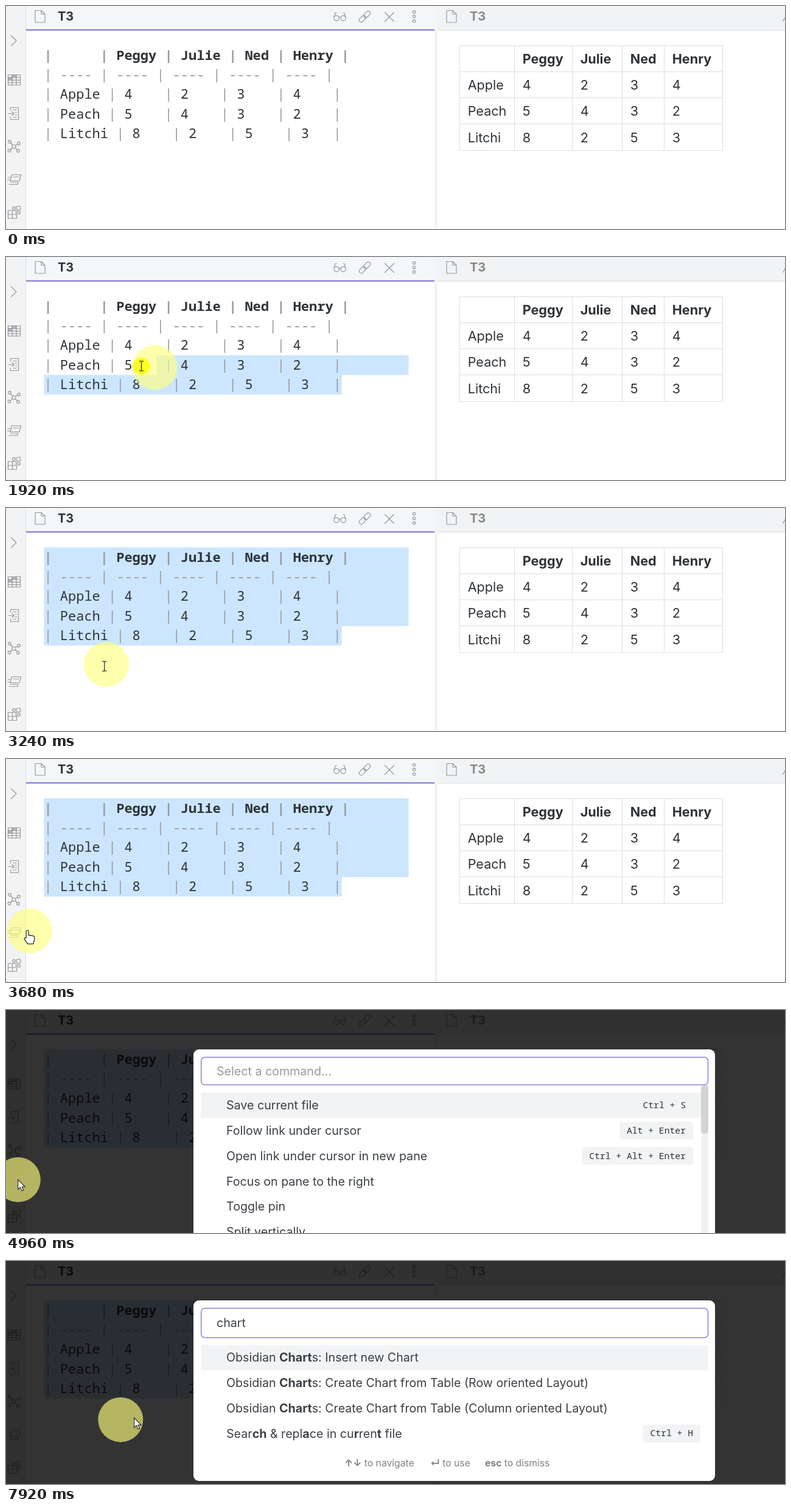
An HTML page for the animation above (8000 ms loop, 1280 by 368 pixels).

```html
<!DOCTYPE html>
<html lang="en">
<head>
<meta charset="utf-8">
<title>Command palette</title>
<style>
  html, body { margin: 0; width: 100%; height: 100%; overflow: hidden; background: #fff; }
  svg { display: block; width: 1280px; height: 368px; }
  text { font-family: Inter, "Open Sans", sans-serif; fill: #2e3338; white-space: pre; }
  .mono { font-family: "Noto Sans Mono", "DejaVu Sans Mono", monospace; }
  .source { font-size: 22px; }
  .cell { font-size: 21.6px; }
  .row { font-size: 19.64px; fill: #3b4046; }
  .key { font-size: 14.7px; }
  .hint { font-size: 15.7px; fill: #7d8185; }
  .bold { font-weight: 700; }
  .dim { fill: #999; }
  .icon { fill: none; stroke: #96999c; stroke-width: 1.2; stroke-linecap: round; stroke-linejoin: round; }
</style>
</head>
<body>
<svg id="stage" viewBox="0 0 1280 368" xmlns="http://www.w3.org/2000/svg">
  <rect width="1280" height="368" fill="#fff"/>
  <rect width="32" height="368" fill="#f2f3f5"/>
  <rect x="32" width="1" height="368" fill="#dcdfe3"/>
  <rect x="33" width="671" height="39" fill="#f5f6f8"/>
  <rect x="33" y="38.5" width="671" height="2" fill="#7b6cd9"/>
  <rect x="704" width="5" height="368" fill="#f3f4f7"/>
  <rect x="709" width="571" height="39" fill="#f2f3f5"/>
  <rect x="709" y="39" width="571" height="1.5" fill="#dfe3e5"/>
  <text x="85" y="24" font-size="20" class="bold">T3</text>
  <text x="762" y="24" font-size="20" class="bold" style="fill:#888">T3</text>
  <g class="icon">
    <path id="page" d="M48 7.5h10l6 6v13.500h-16zM58 7.500v6h6"/>
    <use href="#page" x="676"/>
    <circle cx="543" cy="20" r="4.2"/><circle cx="554" cy="20" r="4.2"/>
    <path d="M547 19q1.500-2 3 0M539 18l2-7h2M558 18l-2-7h-2"/>
    <g transform="rotate(-45 589.500 17.500)">
      <rect x="578" y="14" width="12.500" height="7" rx="3.500"/><rect x="588.500" y="14" width="12.500" height="7" rx="3.500"/>
    </g>
    <path d="M622.500 10.500l15 15m0-15l-15 15"/>
    <circle cx="670.500" cy="9.800" r="2.200"/><circle cx="670.500" cy="17.300" r="2.200"/><circle cx="670.500" cy="24.800" r="2.200"/>
    <path d="M1277 25l3-6"/>
    <path d="M8.500 49l8.500 8-8.500 8.500"/>
    <path d="M3.500 113.500h20v17h-20zM3.500 118h20M3.500 122.300h20M3.500 126.500h20M10 113.500v17M17 113.500v17"/>
    <path d="M10 113.500h7v4.500h-7zM3.500 118h6.500v4.300h-6.500z" fill="#b4b6b9"/>
    <path d="M7.500 172v-4.500h13v20h-13v-4.500M4 177.500h9m-3-3l3 3-3 3M12 171.500h5M15 175.500h2.500M15 179.500h2.500M12 183.500h5"/>
    <path d="M13 232l-6-7M13 232l7-5M13 232l-7 6M13 232l6 6"/>
    <circle cx="13" cy="232" r="3" fill="#f2f3f5"/>
    <circle cx="6" cy="224" r="2.300" fill="#f2f3f5"/><circle cx="21" cy="227" r="2.300" fill="#f2f3f5"/>
    <circle cx="5.500" cy="238.500" r="2.300" fill="#f2f3f5"/><circle cx="20" cy="239" r="2.300" fill="#f2f3f5"/>
    <path d="M9.500 278.500h15l-2.500 10h-15zM7 291h13l-1 3.500h-14M3 283h4M2.500 287h3.500M12 282h9"/>
    <path d="M3.500 337.500h7v6.500h-7zM3.500 344h7v6.500h-7zM10.500 344h7v6.500h-7zM10.500 337.500h6v6.500M17 331l6-1 1 6-6 1z"/>
    <circle cx="13" cy="333.500" r="2.400"/><circle cx="21" cy="341" r="2.400"/>
  </g>
  <g id="selection" fill="#cce6ff"></g>
  <g id="document"></g>
  <g id="tooltip">
    <path d="M35 290l7-6v12z" fill="#191919"/>
    <rect x="41" y="271" width="224" height="37" rx="6" fill="#191919"/>
    <text x="57" y="296.500" font-size="17.7" style="fill:#dcddde">Open command palette</text>
  </g>
  <g id="palette"></g>
  <g id="pointer">
    <circle id="halo" r="37" fill="#ffff7d" fill-opacity=".64"/>
    <circle id="press" r="14" fill="#ffff10" fill-opacity=".9"/>
    <circle id="ring" cx="20" cy="280.500" fill="none" stroke="#fb4528" stroke-width="3"/>
    <path id="beam" d="M-3.500-8h2.500l1 1 1-1h2.500M0-7v14M-3.500 8h2.500l1-1 1 1h2.500" fill="none" stroke="#333" stroke-width="1.300"/>
    <path id="arrow" d="M0 0v16l3.700-3.400 2.600 6 2.700-1.200-2.600-5.700h5z" fill="#fff" stroke="#222" stroke-width="1.100"/>
    <path id="hand" d="M-2 1q2-3 4 0v7q2-1 3 .5 2-1 3 .5 3-1 3.500 2v5l-2 6h-9l-5.500-8q0-3 3-1.500z" fill="#fff" stroke="#222" stroke-width="1.200" stroke-linejoin="round"/>
  </g>
</svg>
<script>
const LOOP = 8000, LAG = 30;
const $ = id => document.getElementById(id);
const show = (el, on) => el.setAttribute('visibility', on ? 'visible' : 'hidden');
const place = (el, [x, y]) => el.setAttribute('transform', `translate(${x} ${y})`);
const clamp = (v, lo, hi) => Math.min(hi, Math.max(lo, v));
const rect = (x, y, w, h, fill, extra = '') =>
  `<rect x="${x}" y="${y}" width="${w}" height="${h}" fill="${fill}" ${extra}/>`;
const text = (x, y, cls, s) => `<text x="${x}" y="${y}" class="${cls}">${s}</text>`;
const strong = s => s.replace(/\*(.+?)\*/g, '<tspan class="bold">$1</tspan>');

// Editor and rendered table
const COLUMN = 13.2, LEFT = 62.4, TOP = 65, LINE = 32.4;
const source = [
  '|      | Peggy | Julie | Ned | Henry |',
  '| ---- | ---- | ---- | ---- | ---- |',
  '| Apple | 4    | 2    | 3    | 4    |',
  '| Peach | 5    | 4    | 3    | 2    |',
  '| Litchi | 8    | 2    | 5    | 3   |'
];
const table = [
  ['', 'Peggy', 'Julie', 'Ned', 'Henry'],
  ['Apple', 4, 2, 3, 4],
  ['Peach', 5, 4, 3, 2],
  ['Litchi', 8, 2, 5, 3]
];
const edges = [745.5, 835.5, 930.5, 1012.5, 1081.5, 1177.5];

function drawDocument() {
  const lines = source.map((line, i) => text(LEFT, 88.6 + i * LINE, 'mono source' + (i ? '' : ' bold'),
    line.replace(/\||-+/g, '<tspan class="dim">$&</tspan>')));
  const cells = table.map((row, r) => row.map((value, c) =>
    text(edges[c] + 13.2, 95 + r * 43.2, 'cell' + (r ? '' : ' bold'), value)).join(''));
  const rules = edges.map(x => `M${x} 65v173.500`).join('') +
    [0, 1, 2, 3, 4].map(r => `M745 ${Math.floor(65 + r * 43.25) + .5}h433`).join('');
  $('document').innerHTML = lines.join('') + cells.join('') + `<path d="${rules}" stroke="#dcdee0"/>`;
}

function drawSelection(t) {
  if (t < 1400) return $('selection').replaceChildren();
  const [x, y] = pointerAt(Math.min(t, 2800) - LAG);
  const first = clamp(Math.floor((y - TOP) / LINE), 0, 4);
  let out = '';
  for (let row = first; row < 5; row++) {
    const end = row < 4 ? 661.5 : 551.5;
    const col = row > first ? 0 : Math.max(0, Math.round((x - LEFT) / COLUMN));
    const start = Math.min(LEFT + col * COLUMN, end);
    out += rect(start, TOP + row * LINE, end - start, LINE + (row < 4 ? .3 : 0), '#cce6ff');
  }
  $('selection').innerHTML = out;
}

// Command palette: rows are [label, shortcut]
const charts = mark => ['Insert new Chart', 'Create Chart from Table (Row oriented Layout)',
  'Create Chart from Table (Column oriented Layout)']
  .map(s => [`Obsidian ${'Charts'.replace(mark, '*$&*')}: ${s}`]);
const stages = [
  { at: 4520, typed: '', thumb: 80, rows: [['Save current file', 'Ctrl + S'],
    ['Follow link under cursor', 'Alt + Enter'], ['Open link under cursor in new pane', 'Ctrl + Alt + Enter'],
    ['Focus on pane to the right'], ['Toggle pin'], ['Split vertically']] },
  { at: 5760, typed: 'c', thumb: 100, rows: [['*C*lose active pane', 'Ctrl + W'],
    ['*C*reate new note', 'Ctrl + N'], ['*C*reate note in new pane', 'Ctrl + Shift + N'],
    ['*C*ycle through panes'], ['Save *c*urrent file', 'Ctrl + S'], ['Delete *c*urrent file']] },
  { at: 6080, typed: 'ch', thumb: 190, rows: [...charts('Ch'),
    ['Sear*ch*: Search in all files', 'Ctrl + Shift + F'],
    ['Sear*ch* &amp; replace in current file', 'Ctrl + H'], ['Toggle *ch*ecklist status', 'Ctrl + Enter']] },
  { at: 6480, typed: 'cha', rows: [...charts('Cha'),
    ['Sear*ch*: Se*a*rch in all files', 'Ctrl + Shift + F'],
    ['Sear*ch* &amp; repl*a*ce in current file', 'Ctrl + H'], ['Toggle *ch*ecklist st*a*tus', 'Ctrl + Enter']] },
  { at: 6680, typed: 'char', rows: [...charts('Char'),
    ['Sear*ch*: Se*ar*ch in all files', 'Ctrl + Shift + F'],
    ['Sear*ch* &amp; repl*a*ce in cu*r*rent file', 'Ctrl + H'], ['Toggle sear*ch* b*ar*']] },
  { at: 6920, typed: 'chart', footer: true, rows: [...charts('Chart'),
    ['Sear*ch* &amp; repl*a*ce in cu*r*ren*t* file', 'Ctrl + H']] }
];
let current;

function drawPalette(stage) {
  if (stage === current) return;
  current = stage;
  if (!stage) return $('palette').replaceChildren();
  const { typed, thumb, rows, footer } = stage;
  const shift = thumb ? 0 : 2, right = thumb ? 1129 : 1141;
  let out = rect(0, 0, 1280, 368, '#000', 'fill-opacity=".8"') +
    rect(308, 65, 857, footer ? 298 : 340, '#fff', 'rx="9"') +
    rect(320.7, 78, 832.8, thumb ? 45.6 : 48.4, '#fff', 'rx="6" stroke="#8f7fe0" stroke-width="1.500"') +
    `<text id="query" x="346" y="${108 + shift / 2}" class="row${typed ? '' : ' dim'}"` +
    `${typed ? '' : ' style="fill:#999"'}>${typed || 'Select a command...'}</text>` +
    rect(320.5, 136.5 + shift, thumb ? 821.5 : 833, 41.5, '#f2f3f5');
  rows.forEach(([label, keys], i) => {
    const mid = 157 + shift + i * 41.8;
    out += text(362, mid + 7.2, 'row', strong(label));
    if (!keys) return;
    const width = keys.length * 8.82 + 24;
    out += rect(right - width, mid - 14.5, width, 29.5, '#f2f3f5', 'rx="4"') +
      text(right - width + 12, mid + 5, 'mono key', keys);
  });
  if (thumb) out += rect(1142, 124, 12, 244, '#f1f1f2') + rect(1142, 124, 12, thumb, '#d3d3d4', 'rx="5"');
  if (footer) out += text(556, 339, 'hint', strong('*↑↓* to navigate')) +
    text(697, 339, 'hint', strong('*↵* to use')) + text(787, 339, 'hint', strong('*esc* to dismiss'));
  out += '<path id="caret" stroke="#222" stroke-width="1.200"/>';
  $('palette').innerHTML = out;
  const x = Math.round(346 + (typed ? $('query').getComputedTextLength() : 0)) + .5;
  $('caret').setAttribute('d', `M${x} ${89 + shift / 2}v24`);
}

// Pointer path: [time, x, y]
const path = [
  [770, 668, 375], [1000, 605, 250], [1170, 583, 212], [1400, 583, 212], [1560, 490, 208],
  [1920, 223, 180], [2080, 135, 165], [2160, 85, 86], [2260, 66, 68], [2530, 57, 59.5],
  [3010, 57, 59.5], [3100, 110, 175], [3190, 167, 256], [3240, 162, 261], [3400, 115, 272],
  [3640, 40, 284], [3810, 19.8, 280], [7620, 19.8, 280], [7760, 90, 275], [7920, 210, 259], [8000, 260, 253]
];

function pointerAt(t) {
  const i = path.findIndex(p => p[0] > t);
  if (i < 1) return path[i ? path.length - 1 : 0].slice(1);
  const [t0, x0, y0] = path[i - 1], [t1, x1, y1] = path[i];
  const k = (t - t0) / (t1 - t0);
  return [x0 + (x1 - x0) * k, y0 + (y1 - y0) * k];
}

function drawPointer(t) {
  const tip = pointerAt(t);
  const open = t >= 4520;
  const kind = open ? 'arrow' : tip[0] > 36 ? 'beam' : 'hand';
  const shown = t >= 800;
  place($('halo'), pointerAt(t - LAG));
  show($('halo'), shown);
  for (const id of ['beam', 'arrow', 'hand']) {
    place($(id), tip);
    show($(id), shown && id === kind);
  }
  place($('press'), tip);
  show($('press'), (t >= 1400 && t < 2840) || (t >= 4280 && t < 4440));
  const age = t - 4280;
  show($('ring'), age >= 0 && age < 240);
  $('ring').setAttribute('r', Math.max(0, 10 + age * .2));
  $('ring').setAttribute('opacity', clamp((240 - age) / 140, 0, 1));
}

function render(t) {
  drawSelection(t);
  $('tooltip').setAttribute('opacity', t < 4520 ? clamp((t - 3760) / 200, 0, 1) : 0);
  drawPalette(stages.filter(s => t >= s.at).pop());
  if (current) show($('caret'), t >= 5480 && t < 7440);
  drawPointer(t);
}

drawDocument();
const start = performance.now();
function tick() {
  render((performance.now() - start) % LOOP);
  requestAnimationFrame(tick);
}
tick();
</script>
</body>
</html>
```
